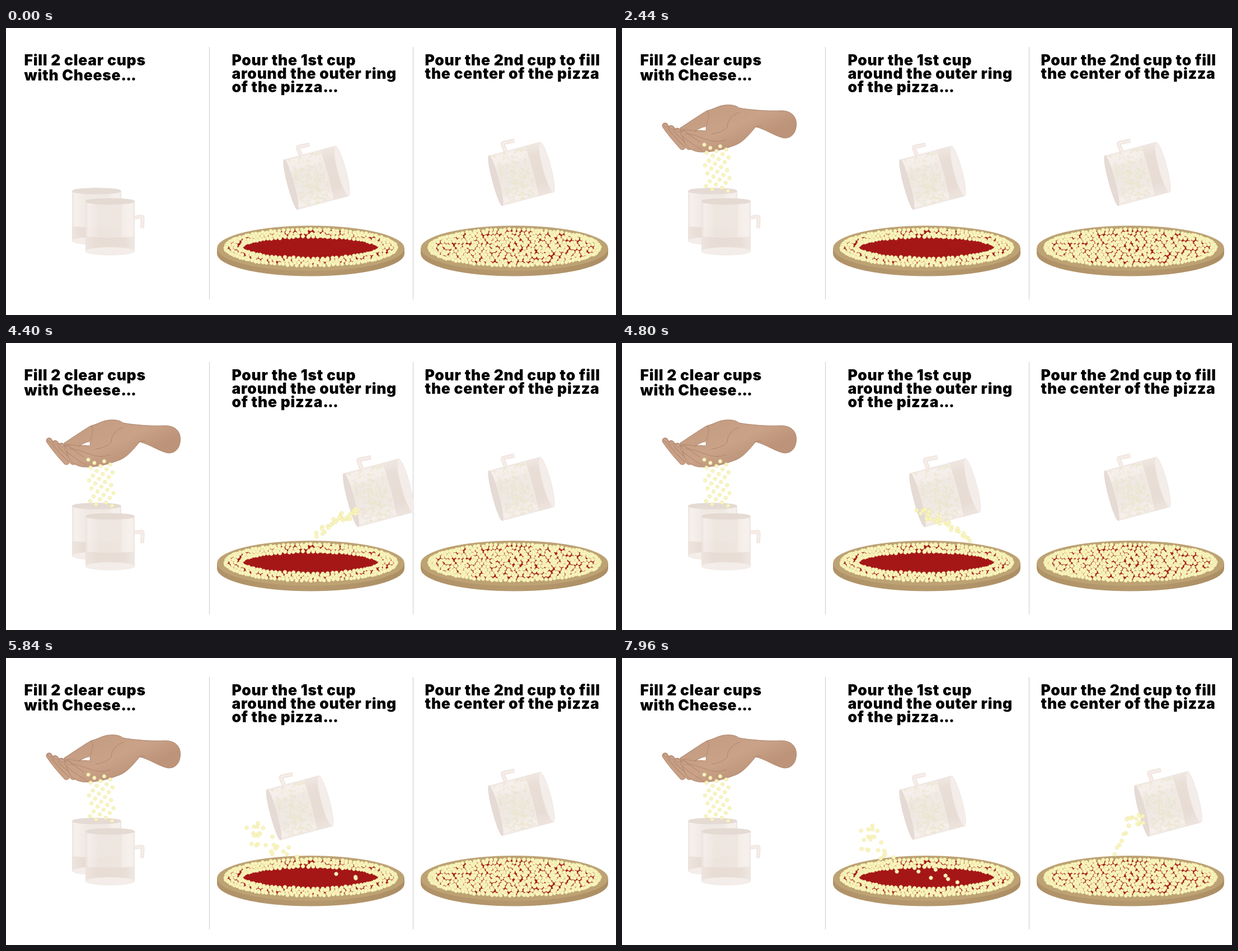
Recreate the animation shown at these times as an HTML page with a canvas. Size 1090 by 514 pixels, loop 8000 ms.

```html
<!DOCTYPE html>
<html lang="en">
<head>
<meta charset="utf-8">
<title>Two cups of cheese</title>
<style>
  html, body { margin: 0; width: 100%; height: 100%; overflow: hidden; background: #fff; }
  canvas, svg { position: absolute; left: 0; top: 0; width: 1090px; height: 514px; }
  text { font: 900 26.5px Inter, "Open Sans", sans-serif; font-optical-sizing: none; letter-spacing: .7px; }
  .dots { letter-spacing: -1px; }
</style>
</head>
<body>
<canvas id="art"></canvas>
<svg viewBox="0 0 1090 514">
  <text x="32.500" y="67">Fill 2 clear cups</text>
  <text x="32.500" y="93.500">with Cheese<tspan class="dots">...</tspan></text>
  <text x="403.500" y="67">Pour the 1st cup</text>
  <text x="403.500" y="91">around the outer ring</text>
  <text x="403.500" y="115">of the pizza<tspan class="dots">...</tspan></text>
  <text x="748.500" y="67">Pour the 2nd cup to fill</text>
  <text x="748.500" y="91">the center of the pizza</text>
</svg>
<script>
const W = 1090, H = 514, LOOP = 8000, STEP = 40;
const ratio = window.devicePixelRatio || 1;

function setup(canvas) {
  canvas.width = W * ratio;
  canvas.height = H * ratio;
  const g = canvas.getContext('2d');
  g.scale(ratio, ratio);
  return g;
}
const ctx = setup(document.getElementById('art'));

function random(seed) {
  return () => {
    seed = (seed * 1664525 + 1013904223) >>> 0;
    return seed / 4294967296;
  };
}
const lerp = (a, b, p) => a + (b - a) * p;
const clamp = p => Math.max(0, Math.min(1, p));
const easeOut = p => 1 - (1 - p) ** 2;

// Smooth curve through rows of [time, value, ...] that never overshoots.
function at(keys, t, col = 1) {
  const last = keys.length - 1;
  if (t <= keys[0][0]) return keys[0][col];
  if (t >= keys[last][0]) return keys[last][col];
  const i = keys.findIndex((k, n) => n < last && t < keys[n + 1][0]);
  const slope = n => (keys[n + 1][col] - keys[n][col]) / (keys[n + 1][0] - keys[n][0]);
  const tangent = n => {
    if (n === 0 || n === last) return 0;
    const a = slope(n - 1), b = slope(n);
    return a * b <= 0 ? 0 : 2 * a * b / (a + b);
  };
  const h = keys[i + 1][0] - keys[i][0], p = (t - keys[i][0]) / h, q = 1 - p;
  return keys[i][col] * (1 + 2 * p) * q * q + tangent(i) * h * p * q * q +
    keys[i + 1][col] * (3 - 2 * p) * p * p - tangent(i + 1) * h * p * p * q;
}

function ellipse(g, x, y, rx, ry, fill, stroke) {
  g.beginPath();
  g.ellipse(x, y, rx, ry, 0, 0, Math.PI * 2);
  if (fill) { g.fillStyle = fill; g.fill(); }
  if (stroke) { g.strokeStyle = stroke; g.stroke(); }
}

function gradient(g, x0, y0, x1, y1, ...stops) {
  const fill = g.createLinearGradient(x0, y0, x1, y1);
  stops.forEach(([p, c]) => fill.addColorStop(p, c));
  return fill;
}

function grain(g, x, y, r = 3.6, turn = 0) {
  g.beginPath();
  for (let k = 0; k < 6; k++) {
    const a = turn + k * Math.PI / 3;
    g.lineTo(x + r * Math.cos(a), y + r * Math.sin(a));
  }
  g.closePath();
  g.fillStyle = '#f9f5bc';
  g.strokeStyle = '#eae3a6';
  g.lineWidth = .6;
  g.lineJoin = 'round';
  g.fill();
  g.stroke();
}

// Cups: mouth centre at the origin, base below.
const body = new Path2D('M-44 0L-44 89A44 7 0 0 0 44 89L44 0A44 5.500 0 0 1 -44 0Z');
const band = new Path2D('M-44 63Q0 67 44 63L44 89A44 7 0 0 0 -44 89Z');
const handle = new Path2D('M44 29L56 27.4Q58.3 27.2 58.2 30L57.3 48');

function mottle(seed, count) {
  const rnd = random(seed), path = new Path2D();
  for (let i = 0; i < count; i++) {
    const x = -41 + rnd() * 82, y = 8 + rnd() * 54, r = 1 + rnd() * 2;
    path.moveTo(x + r, y);
    path.ellipse(x, y, r, r * .7, rnd() * 3, 0, 7);
  }
  return path;
}
const flecks = mottle(5, 170), gaps = mottle(9, 110);

function cup(g, x, y, turn, size, full, hasHandle = true) {
  g.save();
  g.translate(x, y);
  g.rotate(turn * Math.PI / 180);
  g.scale(size, size);
  if (hasHandle) {
    g.lineWidth = 7;
    g.lineJoin = 'round';
    g.lineCap = 'butt';
    g.strokeStyle = '#f1e6e0';
    g.stroke(handle);
    g.lineWidth = 2.5;
    g.strokeStyle = '#f7efec';
    g.stroke(handle);
  }
  g.globalAlpha = .86;
  ellipse(g, 0, 0, 44, 5.5, '#e2d8d1');
  g.fillStyle = gradient(g, -44, 0, 44, 0,
    [0, '#ece1db'], [.06, '#f5eeea'], [.2, '#f1e8e3'], [.27, '#eee5df'],
    [.72, '#eee5df'], [.8, '#f3ebe6'], [.95, '#f5eeea'], [1, '#ebe0da']);
  g.fill(body);
  if (full) {
    g.globalAlpha = .4;
    g.fillStyle = '#e4e0b4';
    g.fill(flecks);
    g.fillStyle = '#e9e2d6';
    g.fill(gaps);
  }
  g.globalAlpha = .9;
  g.fillStyle = gradient(g, -44, 0, 44, 0, [0, '#ede3dd'], [.25, '#e7dbd3'], [.8, '#e8ddd5'], [1, '#efe6e1']);
  g.fill(band);
  g.lineWidth = .7;
  ellipse(g, 0, 89, 44, 7, '#f4eeea', '#ece2dc');
  g.lineWidth = 1.2;
  ellipse(g, 0, 0, 43.5, 5.2, 'rgba(226,216,209,.55)', '#e4dad4');
  g.restore();
}

function pizza(g, dx, open, seed) {
  const rnd = random(seed), cx = 544.5 + dx, cy = 393;
  const inside = (x, y, a, b) => x * x / (a * a) + y * y / (b * b) < 1;
  const wood = gradient(g, cx - 168, 0, cx + 168, 0, [0, '#b09268'], [.5, '#b6996e'], [1, '#ac8e64']);
  ellipse(g, cx, 404, 167.5, 40.5, wood);
  g.fillStyle = wood;
  g.fillRect(cx - 167.5, 394.5, 335, 9.5);
  ellipse(g, cx, 394.5, 167.5, 40.5, '#bda274');
  ellipse(g, cx, cy, 152, 32, '#a51717');

  const bits = [];
  for (let row = 0, y = -31; y < 32; y += 5.4, row++) {
    for (let x = -150 + (row % 2) * 3.5; x < 152; x += 7) {
      const px = x + (rnd() - .5) * 3.4, py = y + (rnd() - .5) * 3;
      if (inside(px, py, 150, 31) && !(open && inside(px, py, 127, 20))) bits.push([px, py]);
    }
  }
  const ring = (rx, ry, n) => {
    for (let i = 0; i < n; i++) {
      const a = i / n * Math.PI * 2;
      bits.push([rx * Math.cos(a) + (rnd() - .5) * 2, ry * Math.sin(a) + (rnd() - .5) * 2]);
    }
  };
  ring(152, 32, 116);
  if (open) ring(125, 19.5, 90);
  bits.sort((a, b) => a[1] - b[1]);
  bits.forEach(([x, y]) => grain(g, cx + x, cy + y, 3.6, rnd() * 2));
}

const skin = gradient(ctx, 170, 140, 205, 215, [0, '#c59d83'], [.55, '#c9a288'], [1, '#bd9479']);
const skinLine = '#a97f66';
const arm = new Path2D('M104 179C118 170 138 156 152 148C165 145 172 139 184 138C194 137 203 138 209 143' +
  'C230 147 262 149 284 148C302 148 312 158 311.500 173C311 189 302 198 289 197C274 194 256 181 239 177' +
  'C228 190 217 204 203 209.500C181 218 160 223 138 222C123 220 117 213 113 207C108 198 106 188 104 179Z');
const hollow = new Path2D('M131 185C139 179 145 177 151 176.500C149 180 152 183 148 184C143 184 137 182 131 185Z');
const folds = new Path2D('M209 151C196 156 188 165 188 178C180 186 168 189 160 190' +
  'M152 149C159 155 152 165 151 174M116 190C129 189 145 200 166 203C174 204 181 202 186 200' +
  'M237 177Q243 174 249 176M106 182C116 180 126 186 133 183');

function finger(k) {
  const x0 = 77 + 11 * k, y0 = 175 + 4.6 * k, x1 = 108 + 12 * k, y1 = 213;
  const line = new Path2D(`M${x0} ${y0}Q${lerp(x0, x1, .4)} ${lerp(y0, y1, .4) + 3} ${x1} ${y1}`);
  ctx.lineCap = 'round';
  ctx.strokeStyle = skinLine;
  ctx.lineWidth = 11;
  ctx.stroke(line);
  ctx.strokeStyle = skin;
  ctx.lineWidth = 9.6;
  ctx.stroke(line);
  ctx.lineWidth = .7;
  ctx.beginPath();
  ctx.ellipse(x0 + 1, y0 - 1, 4, 2, .5, 0, 7);
  ctx.fillStyle = '#cda993';
  ctx.fill();
  ctx.strokeStyle = skinLine;
  ctx.stroke();
}

function hand() {
  for (let k = 0; k < 3; k++) finger(k);
  ctx.fillStyle = skin;
  ctx.strokeStyle = skinLine;
  ctx.lineWidth = .9;
  ctx.fill(arm);
  ctx.stroke(arm);
  finger(3);
  // Blend the front finger into the palm.
  ctx.beginPath();
  ctx.ellipse(146, 211, 9, 7.5, .6, 0, 7);
  ctx.fillStyle = skin;
  ctx.fill();
  ctx.lineWidth = .8;
  ctx.stroke(folds);
  ctx.fillStyle = '#fff';
  ctx.fill(hollow);
  ctx.stroke(hollow);
}

// A heap in the palm that rains down as an even column.
function handful(t) {
  const rnd = random(21), n = 30, p = easeOut(clamp((t - 1200) / 1240));
  for (let i = 0; i < n; i++) {
    const v = Math.sqrt((i + .5) / n);
    const x = 172 + (rnd() - .5) * 32 * (.35 + v * .65), y = 172 + v * 22 + (rnd() - .5) * 5;
    const column = 147 + 46 * (i * .618 % 1);
    grain(ctx, lerp(x, column, p), lerp(y, 209 + i * 2.85, p), 3.5, i);
  }
}

// Loose grains strung from tail over middle to head. Key columns:
// time, tail x y, middle x y, head x y, crowding at the tail, scatter.
function stream(keys, n, seed, t) {
  const begin = keys[0][0], rnd = random(seed);
  if (t < begin) return;
  const [tx, ty, mx, my, hx, hy, crowd, scatter] = keys[0].slice(1).map((_, c) => at(keys, t, c + 1));
  for (let i = 0; i < n; i++) {
    const s = i / (n - 1), u = s ** crowd, loose = scatter * (1 - .6 * u);
    const dx = (rnd() - .5) * loose, dy = (rnd() - .5) * loose * .9;
    if (t < begin + (1 - s) * 400) continue;
    const far = u > .5, p = far ? u * 2 - 1 : u * 2;
    const x = far ? lerp(mx, hx, p) : lerp(tx, mx, p);
    const y = far ? lerp(my, hy, p) : lerp(ty, my, p);
    grain(ctx, x + dx, y + dy, 3.6, i);
  }
}

const ringPour = [
  [3500, 522, 292, 524, 300, 524, 308, 1, 12],
  [4400, 626, 305, 595, 312, 555, 343, 1.2, 22],
  [5200, 437, 304, 525, 318, 677, 360, 1, 20],
  [5840, 440, 313, 500, 349, 648, 399, 1.8, 42],
  [6480, 438, 319, 485, 372, 600, 394, 2, 46]
];
const centerPour = [
  [7300, 896, 288, 898, 292, 900, 298, 1, 10],
  [7960, 930, 287, 903, 295, 877, 352, 1.5, 20]
];

const arrive = [[560, 22, 0], [720, 12, 1], [920, 2, 1], [1500, 0, 1]];
const ringCup = [[3120, 0, 1], [3920, 48, 1.04], [4450, 112, 1.07], [5200, -87, 1.075], [5840, -30, 1.01], [6440, 0, 1]];
const centerCup = [[6880, 0, 1], [7680, 28, 1.01], [7960, 55, 1.02], [8240, 84, 1.03]];

function tilted(x, y, keys, t) {
  // Grow about the middle of the cup.
  const size = at(keys, t, 2);
  cup(ctx, x + at(keys, t) - 47 * size, y + 13 * size, -105, 1.06 * size, true);
}

const still = document.createElement('canvas');
const sg = setup(still);
sg.fillStyle = '#fff';
sg.fillRect(0, 0, W, H);
sg.fillStyle = '#cbcbcb';
for (const x of [363, 727]) sg.fillRect(x, 34, 1, 452);
cup(sg, 162, 292, 0, 1, false, false);
cup(sg, 186, 310.5, 0, 1, false);
pizza(sg, 0, true, 3);
pizza(sg, 364, false, 8);

function draw(now) {
  const t = Math.floor(now % LOOP / STEP) * STEP;
  ctx.drawImage(still, 0, 0, W, H);
  if (t >= 600) {
    ctx.save();
    ctx.globalAlpha = at(arrive, t, 2);
    ctx.translate(at(arrive, t), 0);
    hand();
    handful(t);
    ctx.restore();
  }
  tilted(556, 267.5, ringCup, t);
  stream(ringPour, 33, 77, t);
  tilted(922, 260.5, centerCup, t);
  stream(centerPour, 20, 40, t);
}

const start = performance.now();
function tick() {
  draw(performance.now() - start);
  requestAnimationFrame(tick);
}
tick();
</script>
</body>
</html>
```
